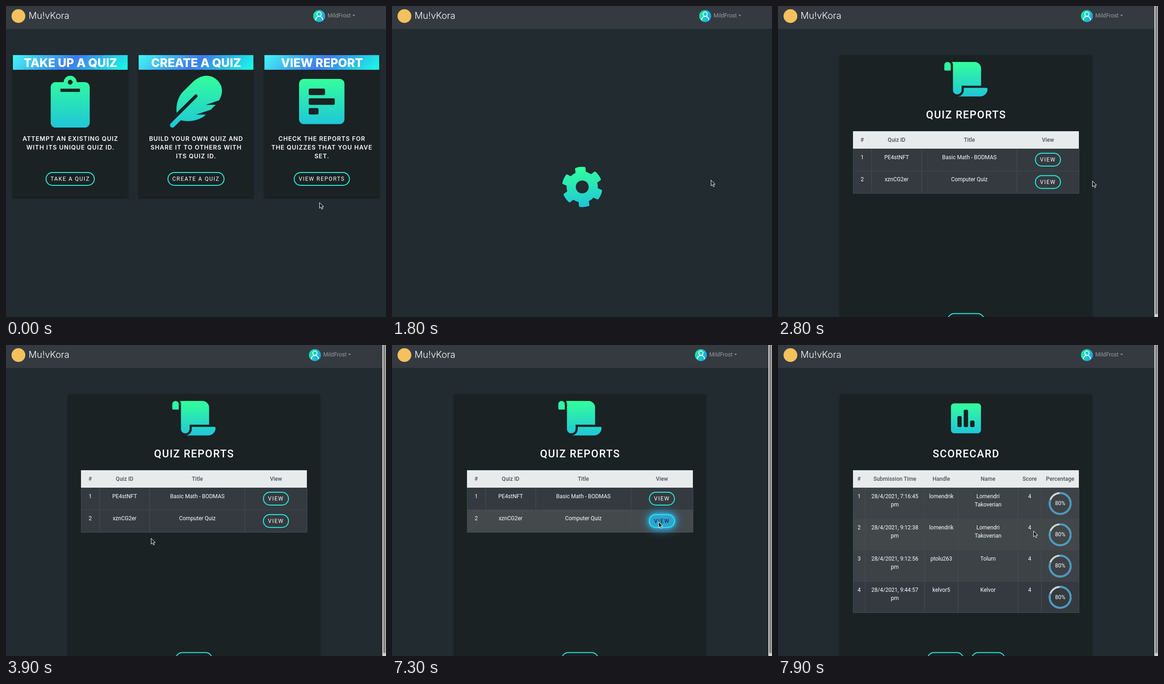
These frames come from a looping animation (826x678 px, 8000 ms). An HTML page:

```html
<!DOCTYPE html>
<html lang="en">
<head>
<meta charset="utf-8">
<title>Quiz reports</title>
<style>
  html, body { margin: 0; width: 100%; height: 100%; overflow: hidden; background: #212b30; }
  svg { display: block; }
  text { font: 12px Roboto, sans-serif; fill: #fff; text-anchor: middle; white-space: pre; }
  .brand { font: 300 20px Inter, sans-serif; text-anchor: start; }
  .user { fill: #999c9f; text-anchor: start; }
  .banner { font: 800 25.5px Inter, sans-serif; }
  .blurb { font: 600 13px Inter, sans-serif; letter-spacing: 1px; }
  .label { letter-spacing: 1.5px; }
  .title { font-size: 23px; font-weight: 500; letter-spacing: 1.5px; }
  .head { font-weight: 500; fill: #495057; }
  .panel { fill: #1a2224; filter: drop-shadow(0 2px 2px rgba(0,0,0,.4)); }
  .pill { fill: none; stroke: #27efdc; stroke-width: 2; }
  .row { fill: #343a40; }
  .line { stroke: #454d55; shape-rendering: crispEdges; }
</style>
</head>
<body>
<svg id="stage" width="826" height="678" viewBox="0 0 826 678"></svg>
<script>
const stage = document.getElementById('stage');
const $ = id => document.getElementById(id);

const text = (x, y, s, cls = '') => `<text x="${x}" y="${y}" class="${cls}">${s}</text>`;
const box = (x, y, w, h, extra = '') => `<rect x="${x}" y="${y}" width="${w}" height="${h}" ${extra}/>`;
const group = (id, body) => `<g id="${id}">${body}</g>`;
// Layered soft shadows of one box, one per blur size.
const glow = (x, y, w, h, r, color, sizes) => sizes.map(size =>
  box(x, y, w, h, `rx="${r}" fill="${color}" style="filter:blur(${size}px)"`)).join('');
const icon = (x, y, scale, d) =>
  `<path transform="translate(${x} ${y}) scale(${scale})" fill="url(#mint)" fill-rule="evenodd" d="${d}"/>`;

function pill(x1, x2, y, s = '', id = '') {
  const w = x2 - x1;
  const shape = box(x1, y, w, 28, 'rx="14" class="pill"');
  const label = text((x1 + x2) / 2, y + 18.3, s, 'label');
  if (!id) return shape + label;
  return group(id + 'Glow', glow(x1 - 1, y - 1, w + 2, 30, 15, '#2aaeea', [12, 7, 2.5])) +
    group(id + 'Fill', box(x1, y, w, 28, 'rx="14" fill="#2fa2d2"')) + shape +
    label.replace('<text', `<text id="${id}Text"`);
}

function card(x, title, lines, art, button, halo = '') {
  const mid = x + 125;
  return halo + box(x, 107, 249.5, 310, 'rx="3" class="panel"') +
    `<g transform="translate(${x} 107)">${box(0, 0, 249.5, 32, 'fill="url(#banner)"')}</g>` +
    text(mid, 133, title, 'banner') + art +
    lines.map((s, i) => text(mid, 294 + i * 19.2, s, 'blurb')).join('') + button;
}

function header(edges, heads) {
  return box(163, 273, 491, 38, 'fill="#e7ebeb"') +
    heads.map((s, i) => text((edges[i] + edges[i + 1]) / 2, 296.3, s, 'head')).join('');
}

// Cells are plain strings, two-line strings, or functions of the row's top edge.
function table(edges, heads, rows, h, prefix) {
  const body = rows.map((cells, r) => {
    const top = 311 + r * h;
    return box(163, top, 491, h, `id="${prefix}${r}" class="row"`) +
      `<path class="line" d="M163 ${top + h}H654"/>` +
      edges.map(x => `<path class="line" d="M${x} ${top}V${top + h}"/>`).join('') +
      cells.map((cell, c) => typeof cell === 'function' ? cell(top) :
        cell.split('\n').map((s, i) =>
          text((edges[c] + edges[c + 1]) / 2, top + 22.6 + i * 18, s)).join('')).join('');
  });
  return header(edges, heads) + body.join('');
}

function ring(top) {
  const circle = (color, dash) =>
    `<circle cx="613.3" cy="${top + 34.5}" r="22.8" fill="none" stroke="${color}" stroke-width="3.9"
      stroke-linecap="round" pathLength="100" stroke-dasharray="${dash}"
      transform="rotate(-90 613.3 ${top + 34.5})"/>`;
  return circle('#d6d6d2', '100 0') + circle('#459bc3', '80 20') + text(613.3, top + 38, '80%');
}

function gearPath() {
  const at = (x, y, a) => {
    const c = Math.cos(a), s = Math.sin(a);
    return `${(x * c - y * s).toFixed(2)} ${(x * s + y * c).toFixed(2)}`;
  };
  let d = '';
  for (let k = 0; k < 6; k++) {
    const a = k * Math.PI / 3;
    d += `${k ? 'A32.5 32.5 0 0 1' : 'M'}${at(-9.8, -31, a)}L${at(-9.8, -41.3, a)}` +
      `A42.5 42.5 0 0 1 ${at(9.8, -41.3, a)}L${at(9.8, -31, a)}`;
  }
  return d + `A32.5 32.5 0 0 1 ${at(-9.8, -31, 0)}Z`;
}

const clipboard = icon(97.2, 152, .2207, `M384 112v352c0 26.5-21.5 48-48 48H48c-26.5 0-48-21.5-48-48V112
  c0-26.5 21.5-48 48-48h80a64 64 0 0 1 128 0h80c26.5 0 48 21.5 48 48z
  M192 40a24 24 0 0 0 0 48 24 24 0 0 0 0-48M96 128h192v32H96z`);
const feather = icon(356.5, 152, .2207, `M467 45c-62-62-162-65-252 26l-86 85C69 217 59 307 65 367L244 189
  c6-6 16-6 22.7 0s6 16 0 22.6L7 471c-9.4 9.4-9.4 24.6 0 34s24.6 9.4 34 0l66-66
  C159 455 279 457 354 384h-98l147-49c50-50 37-36 47-47h-98l131-44c46-74 35-149-16-199z`);
const hole = (x, y, w, h) => box(x, y, w, h, 'rx="3" fill="#1a2224"');
const report = box(637, 159, 98.7, 98.5, 'rx="10" fill="url(#mint)"') +
  hole(658, 180, 35.5, 14.2) + hole(658, 201.2, 56.6, 14.2) + hole(658, 222.4, 21.3, 14.2);
const scroll = icon(361.5, 122, .147, `M48 0C21.5 0 0 21.5 0 48v64c0 9 7 16 16 16h80V48C96 21.5 74.5 0 48 0z
  M256 412.6V352h288V96c0-53-43-96-96-96H111.6C122 13 128 30 128 48v368c0 39 35 70 75 63 31-5 53-35 53-66.4z
  M288 384v32c0 53-43 96-96 96h336c62 0 112-50 112-112 0-9-7-16-16-16H288z`);
const chart = box(376, 127.3, 65.2, 65.2, 'rx="7" fill="url(#mint)"') +
  hole(390, 155, 9.3, 24) + hole(403.7, 141, 9.5, 38) + hole(417.7, 164.7, 9.5, 14.3);

const cardGlow = group('cardGlow', glow(561, 106.5, 251, 311, 3, '#86e8be', [16, 7, 2.5]));

const scoreHeads = ['#', 'Submission Time', 'Handle', 'Name', 'Score', 'Percentage'];
const entry = (n, time, handle, name) => [`${n}`, `28/4/2021, ${time}\npm`, handle, name, '4', ring];

stage.innerHTML = `
<defs>
  <linearGradient id="mint" x2="0" y2="1"><stop stop-color="#33ff9b"/><stop offset="1" stop-color="#1fc6d8"/></linearGradient>
  <linearGradient id="banner" gradientUnits="userSpaceOnUse" x1="54.5" y1="-54.5" x2="195.5" y2="86.5">
    <stop stop-color="#43f7f5"/><stop offset=".5" stop-color="#3d7cee"/><stop offset="1" stop-color="#18ffe4"/></linearGradient>
  <linearGradient id="avatar" y2=".4"><stop stop-color="#1df598"/><stop offset="1" stop-color="#1ca6ea"/></linearGradient>
</defs>` +
  box(0, 0, 826, 678, 'fill="#212b30"') +
  group('home',
    card(15, 'TAKE UP A QUIZ', ['ATTEMPT AN EXISTING QUIZ', 'WITH ITS UNIQUE QUIZ ID.'],
      clipboard, pill(87, 192, 363, 'TAKE A QUIZ')) +
    card(288.3, 'CREATE A QUIZ', ['BUILD YOUR OWN QUIZ AND', 'SHARE IT TO OTHERS WITH', 'ITS QUIZ ID.'],
      feather, pill(352, 474, 363, 'CREATE A QUIZ')) +
    card(561.7, 'VIEW REPORT', ['CHECK THE REPORTS FOR', 'THE QUIZZES THAT YOU HAVE', 'SET.'],
      report, pill(626.5, 746.5, 363, 'VIEW REPORTS', 'open'), cardGlow)) +
  group('loading', `<g transform="translate(413.5 394.5)">
    <path id="gear" d="${gearPath()}" fill="url(#mint)" stroke="url(#mint)" stroke-width="3" stroke-linejoin="round"/>
    <circle r="14" fill="#212b30"/></g>`) +
  group('panel', box(135, 107, 547, 600, 'rx="4" class="panel"')) +
  group('reports', scroll + text(409, 245, 'QUIZ REPORTS', 'title') +
    table([163, 203, 312.5, 519.5, 654], ['#', 'Quiz ID', 'Title', 'View'], [
      ['1', 'PE4stNFT', 'Basic Math - BODMAS', y => pill(559.5, 614, y + 10, 'VIEW')],
      ['2', 'xznCG2er', 'Computer Quiz', y => pill(559.5, 614, y + 10, 'VIEW', 'view')]
    ], 48.7, 'quiz') + pill(369, 448, 670.5)) +
  group('score', chart + text(409, 245, 'SCORECARD', 'title') +
    group('empty', header([163, 202, 343, 418, 485, 551, 654], scoreHeads)) +
    group('full', table([163, 189.5, 318.5, 391.5, 521.5, 572.5, 654], scoreHeads, [
      entry(1, '7:16:45', 'lomendrik', 'Lomendri\nTakoverian'),
      entry(2, '9:12:38', 'lomendrik', 'Lomendri\nTakoverian'),
      entry(3, '9:12:56', 'ptolu263', 'Tolurn'),
      entry(4, '9:44:57', 'kelvor5', 'Kelvor')
    ], 68.2, 'entry')) + pill(325, 403, 670.5) + pill(421, 493, 670.5)) +
  box(0, 0, 826, 50, 'fill="#343a40"') +
  '<circle cx="27" cy="22" r="15" fill="#f5c15c"/>' + text(49, 28, 'Mu!vKora', 'brand') +
  group('account', `<circle cx="680.7" cy="22" r="13" fill="url(#avatar)"/>
    <g fill="none" stroke="#fff" stroke-width="1.7" stroke-linecap="round">
    <circle cx="680.7" cy="17.8" r="4.6"/><path d="M673 30a7.7 7.7 0 0 1 15.4 0"/></g>
    <path d="M753 19.3h6l-3 3z" fill="#999c9f"/>` + text(699, 25.4, 'MildFrost', 'user')) +
  group('scrollbar', box(818, 0, 8, 678, 'fill="#d0d0ce"') + box(820, 0, 5, 672, 'rx="2" fill="#858585"')) +
  `<g id="cursor"><path id="arrow" d="M.5.5V13L3.500 10.500 5.500 15 7.700 14.100 5.700 9.700H9.500Z" fill="#151a1c" stroke="#fff"/>
    <path id="hand" transform="translate(-4 0)" fill="#fff" stroke="#111" stroke-width=".9"
      d="M3 1.5a1.3 1.3 0 0 1 2.6 0V6l5 1.2q1.4.4 1.2 2L11 14H4.5L.7 9q-.5-1.5 1-1.3L3 8.8Z"/></g>`;

// time, x, y
const track = [
  [0, 681, 428], [700, 694.5, 379], [1700, 694.5, 379], [1800, 693, 379], [2300, 693, 379],
  [2400, 687, 381], [2700, 687, 381], [2800, 683, 381], [2900, 683, 381], [3200, 697, 310],
  [3400, 610, 253], [3600, 450, 280], [3800, 327, 388], [3900, 315, 421],
  [4700, 579, 385], [7600, 579, 385], [7900, 555, 405], [8000, 555, 405]
];

function pointer(t) {
  const i = track.findIndex(k => k[0] > t);
  const [t0, x0, y0] = track[i - 1], [t1, x1, y1] = track[i];
  const f = (t - t0) / (t1 - t0);
  return [x0 + (x1 - x0) * f, y0 + (y1 - y0) * f];
}

const fade = (t, start, length) => Math.min(1, Math.max(0, (t - start) / length));
const show = (id, on) => $(id).style.display = on ? '' : 'none';

function highlight(id, fill, halo) {
  $(id + 'Fill').style.opacity = fill;
  $(id + 'Glow').style.opacity = halo;
  $(id + 'Text').style.fill = fill > .5 ? '#10191d' : '#fff';
}

['#3e4347', '#424749', '#3d4247'].forEach((c, i) => $('entry' + i).style.fill = c);

function draw(t) {
  const [x, y] = pointer(t);
  const wide = t < 2400;
  show('home', t < 1800);
  show('loading', t >= 1800 && wide);
  show('panel', !wide);
  show('scrollbar', !wide);
  show('reports', !wide && t < 7400);
  show('score', t >= 7400);
  show('empty', t < 7700);
  show('full', t >= 7700);
  $('account').setAttribute('transform', `translate(${wide ? 0 : -9.2} 0)`);
  $('gear').setAttribute('transform', `rotate(${(t - 1833) * .18})`);

  $('cardGlow').style.opacity = fade(t, 100, 500);
  highlight('open', fade(t, 400, 300), fade(t, 400, 500));
  highlight('view', fade(t, 4500, 200), fade(t, 4700, 500));
  for (let r = 0; r < 2; r++) {
    const top = 311 + r * 48.7;
    const over = x > 163 && x < 654 && y >= top && y < top + 48.7;
    $('quiz' + r).style.fill = over ? '#44494c' : '';
  }

  const hand = (t >= 500 && t < 1800) || (t >= 4700 && t < 7300);
  show('hand', hand);
  show('arrow', !hand);
  $('cursor').setAttribute('transform', `translate(${x} ${y})`);
}

function loop() {
  draw(Math.floor(performance.now() % 8000 / 100) * 100);
  requestAnimationFrame(loop);
}
loop();
</script>
</body>
</html>
```
